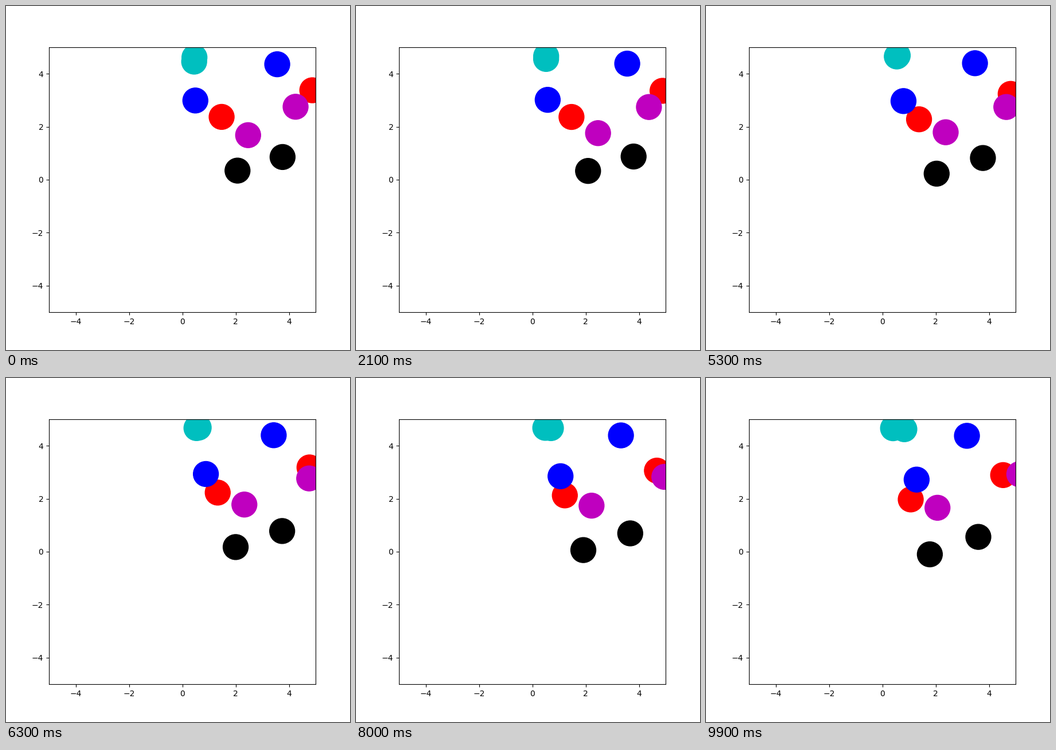
Animation, 600 px wide and 600 px high, one loop 10 s. Source, as a matplotlib script:

```python
import numpy as np
import matplotlib.pyplot as plt
from matplotlib.animation import FuncAnimation

FRAMES, INTERVAL = 100, 100
G = 0.01  # size of the pull, units per second squared
NEVER = np.inf


def ball(color, start, speed, pull=(-1, -1), turn=(NEVER, NEVER)):
    """Pull is given in G per axis; it reverses at the turn time (seconds)."""
    return color, start, speed, pull, turn


BALLS = [
    ball("k", (2.071, 0.344), (0.0204, 0.0048)),
    ball("k", (3.761, 0.857), (0.0290, 0.0195), turn=(7.8, NEVER)),
    ball("r", (1.475, 2.372), (0.0082, 0.0093)),
    ball("r", (4.877, 3.377), (0.0147, 0.0006)),
    ball("b", (0.490, 2.991), (0.0311, 0.0224), pull=(1, -1)),
    ball("b", (3.561, 4.359), (0.0105, 0.0141), pull=(-1, -0.25)),
    ball("m", (2.469, 1.682), (0.0092, 0.0472)),
    ball("m", (4.249, 2.755), (0.0495, 0.0054), pull=(1, -1), turn=(6.9, 2.1)),
    ball("c", (0.445, 4.459), (0.0452, 0.0552), pull=(-1, -0.7)),
    ball("c", (0.456, 4.619), (0.0409, 0.0283), pull=(-1, -0.56), turn=(3.15, NEVER)),
]

colors = [b[0] for b in BALLS]
start, speed, pull, turn = (np.array([b[k] for b in BALLS]) for k in range(1, 5))


def positions(t):
    after = np.maximum(t - turn, 0)
    return start + speed * t + G * pull * (t**2 / 2 - after**2)


fig, ax = plt.subplots(figsize=(6, 6), dpi=100)
ax.set(xlim=(-5, 5), ylim=(-5, 5))
dots = ax.scatter(*positions(0).T, s=1000, c=colors)


def update(i):
    dots.set_offsets(positions(i * INTERVAL / 1000))
    return dots,


anim = FuncAnimation(fig, update, frames=FRAMES, interval=INTERVAL,
                     repeat=True, repeat_delay=0)
plt.show()
```
